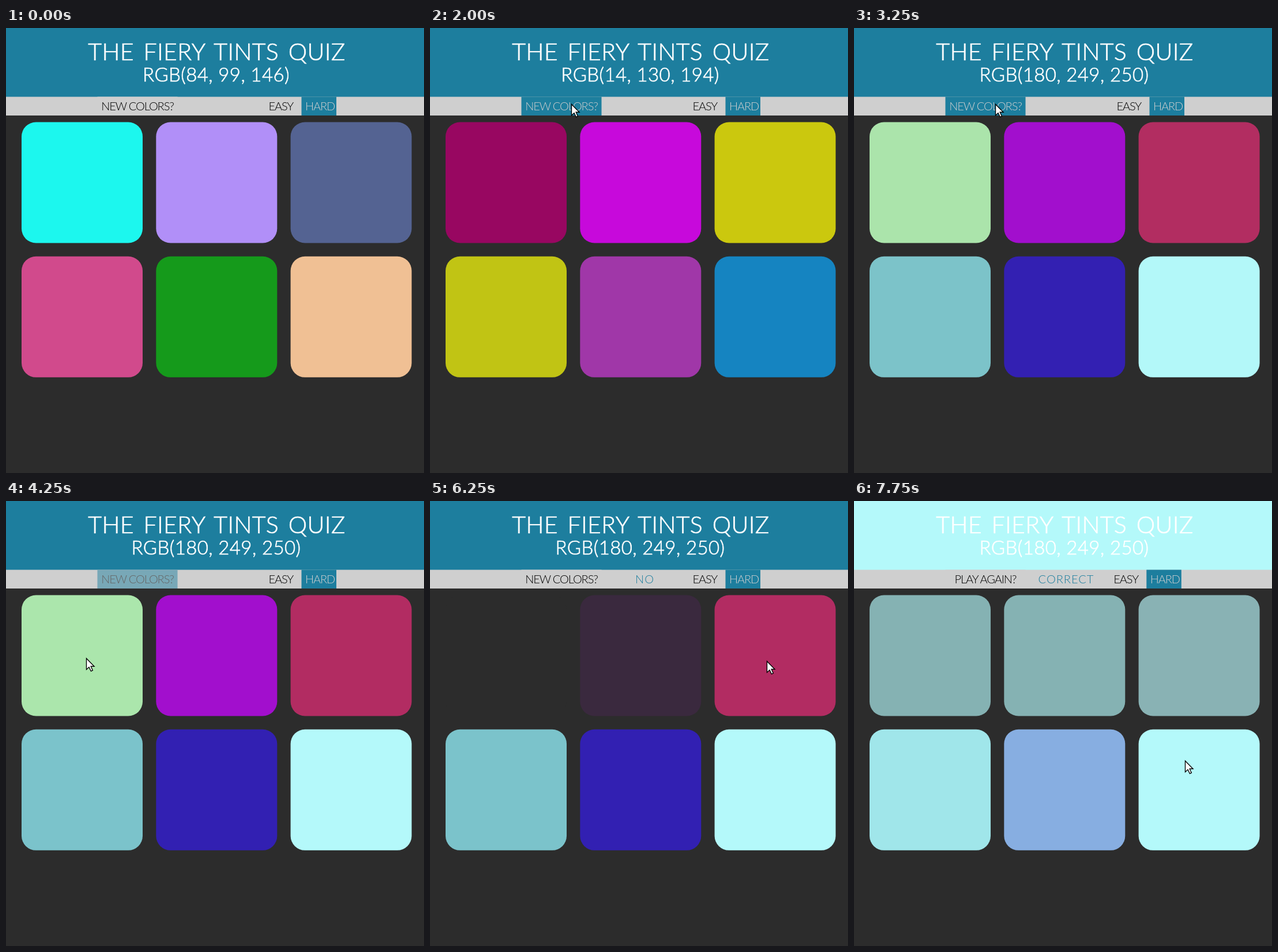
Animation, 725 px wide and 773 px high, one loop 8000 ms. Source, as an HTML page:

```html
<!DOCTYPE html>
<html lang="en">
<head>
<meta charset="utf-8">
<title>Color guessing game</title>
<style>
  html, body { margin: 0; width: 100%; height: 100%; overflow: hidden; background: #2c2c2c; }
  svg { display: block; width: 725px; height: 773px; }
  text { font-family: Lato, "Open Sans", sans-serif; font-weight: 300; white-space: pre; }
  .head { fill: #fff; stroke: #fff; stroke-width: .7; text-anchor: middle; letter-spacing: .4px; }
  .nav { font-size: 20px; letter-spacing: -1.1px; }
  .note { font-size: 20px; letter-spacing: 1px; fill: #1d7e9e; text-anchor: middle; }
</style>
</head>
<body>
<svg viewBox="0 0 725 773" xmlns="http://www.w3.org/2000/svg">
  <rect width="725" height="773" fill="#2c2c2c"/>
  <rect id="header" width="725" height="120"/>
  <text class="head" x="365.5" y="56" font-size="41" word-spacing="5">THE FIERY TINTS QUIZ</text>
  <text class="head" id="goal" x="364.5" y="93" font-size="33"></text>
  <rect y="119.5" width="725" height="32.5" fill="#cfcfcf"/>
  <rect id="resetBox" x="158.5" y="119.5" width="139" height="32.5"/>
  <text class="nav" id="reset" x="228" y="143" text-anchor="middle"></text>
  <text class="note" id="note" y="143"></text>
  <g id="levels">
    <text class="nav" x="455.5" y="143">EASY</text>
    <rect x="512.5" y="119.5" width="60.5" height="32.5" fill="#1d7e9e"/>
    <text class="nav" x="519" y="143" fill="#cfcfcf">HARD</text>
  </g>
  <g id="tiles"></g>
  <path id="cursor" d="M0 0V17L4 13.3L7 19.5L9.6 18.3L6.8 12.2H12Z"
        fill="#fff" stroke="#000" stroke-width="1.2"/>
</svg>
<script>
const LOOP = 8000, STEP = 250, FADE = 1000;
const ENTER = 1120, LEAVE = 3950, DEALS = [0, 1220, 2375], WIN = 7370;
const missAt = i => 4570 + 1080 * i;

const $ = id => document.getElementById(id);
const hex = s => [0, 2, 4].map(i => parseInt(s.slice(i, i + 2), 16));
const palette = s => s.split(" ").map(hex);
const rgb = c => `rgb(${c.map(Math.round).join(", ")})`;
const mix = (a, b, k) => a.map((v, i) => v + (b[i] - v) * k);
const clamp = (v, lo, hi) => Math.min(hi, Math.max(lo, v));

const [BACK, TEAL, SILVER, BLACK] = palette("2c2c2c 1d7e9e cfcfcf 000000");
const deals = [
  palette("1cf7ee b18ff8 546392 d14a8c 159a1b f0c094"),
  palette("9c005d c805da cfcb0a c0c810 a434ac 0e82c2"),
  palette("abe6ac a20fcd b22c62 7bc3cb 3220b2 b4f9fa")
];
const answers = [deals[0][2], deals[1][5], deals[2][5]];

// The pointer rests on the reset button, then on the four tiles it clicks.
const rests = [[245, 132], [139, 273], [371, 270], [584, 278], [574, 451]];

// cubic-bezier(.25, .1, .25, 1)
function ease(x) {
  if (x <= 0) return 0;
  if (x >= 1) return 1;
  let lo = 0, hi = 1, u = .5;
  for (let i = 0; i < 24; i++) {
    u = (lo + hi) / 2;
    const px = .75 * u * (1 - u) + u * u * u;
    if (px < x) lo = u; else hi = u;
  }
  return .3 * u * (1 - u) * (1 - u) + 3 * u * u * (1 - u) + u * u * u;
}

// Each change fades on from whatever value is showing.
function fade(start, changes, t) {
  let from = start, to = start, since = -FADE;
  for (const [at, value] of changes) {
    if (t < at) break;
    from = mix(from, to, ease((at - since) / FADE));
    to = value;
    since = at;
  }
  return mix(from, to, ease((t - since) / FADE));
}

const tiles = deals[0].map((start, i) => {
  const el = document.createElementNS("http://www.w3.org/2000/svg", "rect");
  const x = 27 + i % 3 * 233.3, y = 163.5 + Math.floor(i / 3) * 233.3;
  const box = { x, y, width: 210, height: 210, rx: 25 };
  for (const k in box) el.setAttribute(k, box[k]);
  $("tiles").append(el);
  const changes = [1, 2].map(n => [DEALS[n], deals[n][i]]);
  if (i < 3) changes.push([missAt(i), BACK]);
  changes.push([WIN, answers[2]]);
  return { el, start, changes };
});

// One move a second, half of it travel and half rest.
function moveCursor(t) {
  const k = clamp((t - 3750) / 1000, -1, 3.5);
  const i = Math.floor(k);
  const [x, y] = k < 0 ? rests[0] : mix(rests[i], rests[i + 1], Math.min(1, 2 * (k - i)));
  $("cursor").style.display = t < ENTER ? "none" : "";
  $("cursor").setAttribute("transform", `translate(${x + .5} ${y + .5}) scale(1.13)`);
}

function draw(t) {
  const won = t >= WIN;
  const round = DEALS.filter(at => at <= t).length - 1;
  const [hover] = fade([0], [[ENTER, [1]], [LEAVE, [0]]], t);

  $("header").setAttribute("fill", rgb(won ? answers[2] : TEAL));
  $("goal").textContent = rgb(answers[round]).toUpperCase();
  $("resetBox").setAttribute("fill", rgb(mix(SILVER, TEAL, hover)));
  $("reset").setAttribute("fill", rgb(mix(BLACK, SILVER, hover)));
  $("reset").textContent = won ? "PLAY AGAIN?" : "NEW COLORS?";
  $("note").textContent = won ? "CORRECT" : t >= missAt(0) ? "NO" : "";
  $("note").setAttribute("x", won ? 368 : 372.5);
  $("levels").setAttribute("transform", `translate(${won ? -5.2 : 0} 0)`);

  for (const { el, start, changes } of tiles) el.setAttribute("fill", rgb(fade(start, changes, t)));
  moveCursor(t);
}

const began = performance.now();
function tick() {
  const t = (performance.now() - began) % LOOP;
  draw(Math.floor(t / STEP) * STEP);
  requestAnimationFrame(tick);
}
tick();
</script>
</body>
</html>
```
